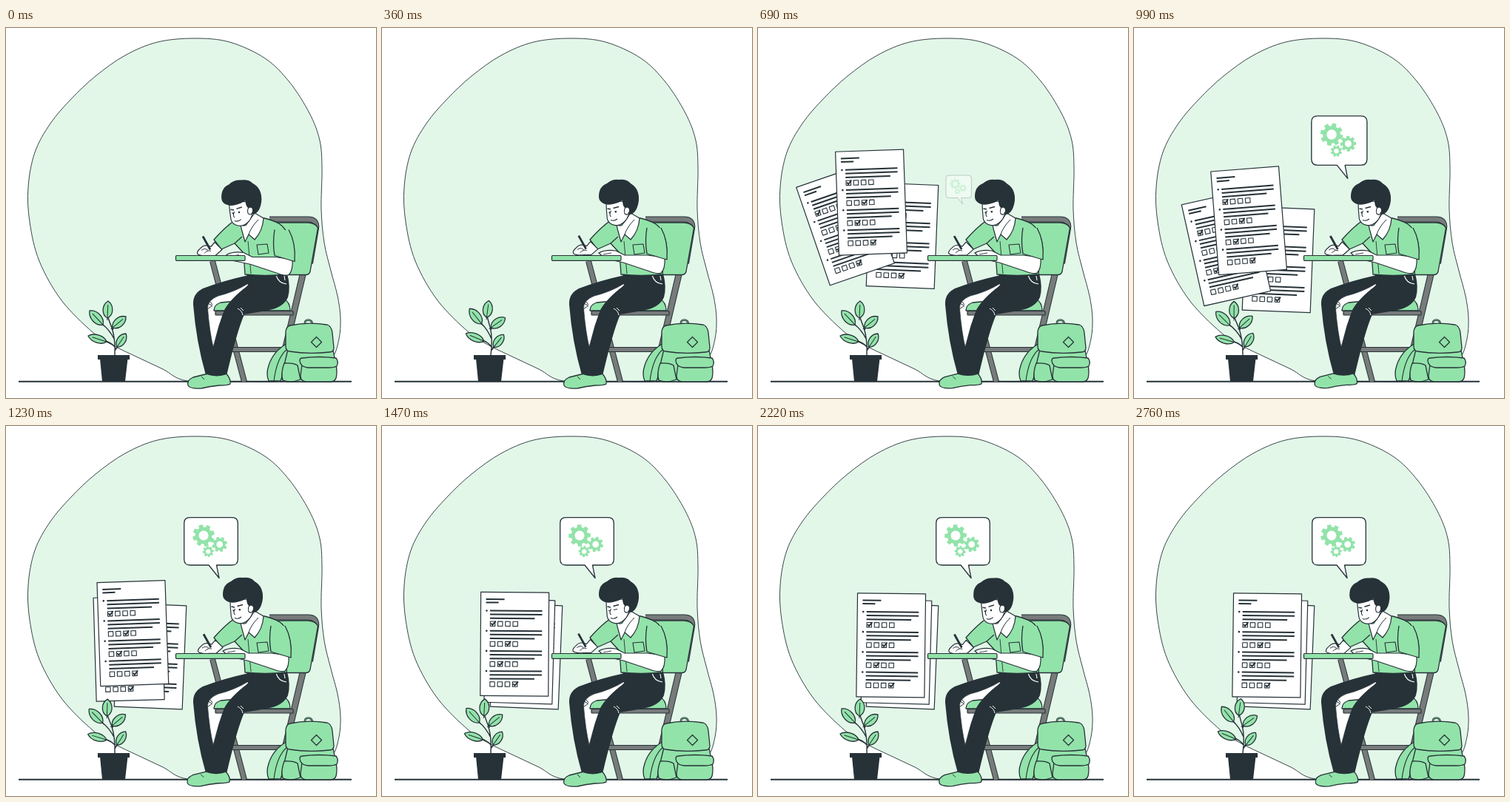
An HTML page with a canvas that plays this animation: 500 by 500 pixels, repeating every 2790 ms.

```html
<!DOCTYPE html>
<html lang="en">
<head>
<meta charset="utf-8">
<title>Student taking an exam</title>
<style>
html, body { margin: 0; width: 100%; height: 100%; overflow: hidden; background: #fff; }
canvas { display: block; width: 500px; height: 500px; }
</style>
</head>
<body>
<canvas id="stage" width="500" height="500"></canvas>
<script>
const ctx = document.getElementById('stage').getContext('2d');
const LOOP = 2790;
const INK = '#263238', GREEN = '#92e3a9', GRAY = '#777b7a', WHITE = '#fff', PALE = '#e3f7e9';

const clamp = v => Math.max(0, Math.min(1, v));
const lerp = (a, b, p) => a + (b - a) * p;
const inOut = p => p < 0.5 ? 4 * p ** 3 : 1 - (2 - 2 * p) ** 3 / 2;

// overshooting cubic-bezier(.36, -.01, .5, 1.38)
function spring(x) {
  const bez = (u, a, b) => 3 * (1 - u) ** 2 * u * a + 3 * (1 - u) * u * u * b + u ** 3;
  let lo = 0, hi = 1;
  for (let i = 0; i < 24; i++) {
    const mid = (lo + hi) / 2;
    if (bez(mid, 0.36, 0.5) < x) lo = mid; else hi = mid;
  }
  return bez(lo, -0.01, 1.38);
}

// smooth interpolation through [time, value] keys
function keyed(t, keys) {
  for (let i = 1; i < keys.length; i++) {
    const [t0, a] = keys[i - 1], [t1, b] = keys[i];
    if (t <= t1) {
      const p = clamp((t - t0) / (t1 - t0));
      return lerp(a, b, p * p * (3 - 2 * p));
    }
  }
  return keys[keys.length - 1][1];
}

function paint(fill, stroke, width = 1.3) {
  if (fill) { ctx.fillStyle = fill; ctx.fill(); }
  if (stroke) { ctx.strokeStyle = stroke; ctx.lineWidth = width; ctx.stroke(); }
}

function shape(d, fill, stroke = INK, width = 1.3) {
  const p = new Path2D(d);
  if (fill) { ctx.fillStyle = fill; ctx.fill(p); }
  if (stroke) { ctx.strokeStyle = stroke; ctx.lineWidth = width; ctx.stroke(p); }
}

const line = (d, width = 1.3, color = INK) => shape(d, null, color, width);

function box(x, y, w, h, r, fill, stroke, width) {
  ctx.beginPath();
  ctx.roundRect(x, y, w, h, r);
  paint(fill, stroke, width);
}

function dot(x, y, r, color = INK) {
  ctx.beginPath();
  ctx.arc(x, y, r, 0, Math.PI * 2);
  paint(color);
}

// closed smooth outline through points
function smooth(pts, fill, stroke, width) {
  const n = pts.length, at = i => pts[(i + n) % n];
  ctx.beginPath();
  ctx.moveTo(...pts[0]);
  for (let i = 0; i < n; i++) {
    const [a, b, c, d] = [at(i - 1), at(i), at(i + 1), at(i + 2)];
    ctx.bezierCurveTo(b[0] + (c[0] - a[0]) / 6, b[1] + (c[1] - a[1]) / 6,
      c[0] - (d[0] - b[0]) / 6, c[1] - (d[1] - b[1]) / 6, c[0], c[1]);
  }
  paint(fill, stroke, width);
}

function placed(x, y, deg, draw) {
  ctx.save();
  ctx.translate(x, y);
  ctx.rotate(deg * Math.PI / 180);
  draw();
  ctx.restore();
}

const turned = (x, y, deg, draw) => placed(x, y, deg, () => { ctx.translate(-x, -y); draw(); });

const BLOB = [[255, 14], [302, 19], [350, 41], [383, 73], [410, 115], [424, 152], [427, 190],
  [426, 245], [430, 290], [439, 328], [448, 362], [452, 392], [450, 420], [441, 446], [418, 467],
  [385, 477], [320, 478], [245, 477], [212, 461], [178, 445], [145, 429], [117, 411], [75, 368],
  [45, 315], [32, 262], [30, 215], [39, 168], [60, 129], [88, 96], [121, 65], [161, 37], [205, 19]];

function backdrop() {
  smooth(BLOB, PALE, INK, 0.9);
  line('M17 477.800H467', 2);
}

function paper() {
  box(-46, -70, 92, 140, 0, WHITE, INK, 1.2);
  ctx.save();
  ctx.translate(-46, -70);
  line('M7 9.5H32M7 14H24', 2);
  [0, 2, 1, 3].forEach((tick, row) => {
    const y = 25 + row * 27.2;
    dot(8, y, 1.3);
    line(`M12.5 ${y}H83M12.5 ${y + 5}H83M12.5 ${y + 10.3}H73`, 2);
    for (let i = 0; i < 4; i++) {
      const x = 13 + i * 10.2;
      box(x, y + 14.5, 6.4, 6.4, 0, WHITE, INK, 1.1);
      if (i === tick) line(`M${x + 1} ${y + 17}l2 2.4 4.4-5.4`, 1.9);
    }
  });
  ctx.restore();
}

function papers(t) {
  const run = (t - 440) / 570;
  if (run <= 0) return;
  const drop = spring(clamp(run));
  const f = clamp((t - 690) / 910), p = inOut(f);
  const lift = Math.sin(Math.PI * f) * (1 - f);
  ctx.save();
  ctx.globalAlpha = clamp(drop * 2);
  ctx.translate(0, -80 * (1 - drop));
  placed(195, 311, 2.3, paper);
  placed(lerp(118, 187, p) - 6 * lift, lerp(297, 305, p) - 5 * lift, lerp(-19, 1.5, p) + 6 * lift, paper);
  placed(lerp(153, 179.7, p) - 3 * lift, lerp(266, 296.4, p) - 21 * lift, lerp(-2, 0.7, p) - 5 * lift, paper);
  ctx.restore();
}

function gear(x, y, r, hole, deg) {
  placed(x, y, deg, () => {
    ctx.beginPath();
    for (let i = 0; i < 8; i++) {
      const a = i * Math.PI / 4;
      [[-0.26, 0.76], [-0.18, 1], [0.18, 1], [0.26, 0.76]].forEach(([da, k]) =>
        ctx.lineTo(Math.cos(a + da) * r * k, Math.sin(a + da) * r * k));
    }
    ctx.closePath();
    ctx.moveTo(hole, 0);
    ctx.arc(0, 0, hole, 0, Math.PI * 2);
    ctx.fillStyle = GREEN;
    ctx.fill('evenodd');
  });
}

function bubble(t) {
  const run = (t - 497) / 520;
  if (run <= 0) return;
  const s = spring(clamp(run)), spin = t * 0.06;
  if (s <= 0) return;
  ctx.save();
  ctx.globalAlpha = clamp(s < 0.6 ? s * 0.8 : 0.48 + (s - 0.6) * 1.3);
  ctx.translate(266, 267);
  ctx.scale(s, s);
  ctx.translate(-266, -267);
  shape('M248.5 123.7H305.5Q313.3 123.7 313.3 131.5V180Q313.3 188 305.5 188H284.5L288 205.5 274 188H248.5Q240.7 188 240.7 180V131.5Q240.7 123.7 248.5 123.7Z', WHITE);
  gear(267, 148, 15, 6.5, spin);
  gear(288.7, 160, 10.4, 4.4, -spin + 12);
  gear(273.2, 169.6, 7.6, 3.2, spin + 8);
  ctx.restore();
}

function leaf(x0, y0, x1, y1, width) {
  const len = Math.hypot(x1 - x0, y1 - y0);
  placed(x0, y0, Math.atan2(y1 - y0, x1 - x0) * 180 / Math.PI, () => {
    shape(`M0 0C${len * 0.2} ${-width} ${len * 0.75} ${-width} ${len} 0C${len * 0.75} ${width} ${len * 0.2} ${width} 0 0Z`, GREEN);
    line(`M-3 0H${len * 0.78}`, 1);
  });
}

function plant(t) {
  const sway = keyed(t, [[0, 0], [360, 5], [690, 0], [990, -2.2], [1470, 0.8], [2220, 0], [2760, 5], [2790, 3]]);
  turned(147, 442, sway, () => {
    line('M147 443Q148 420 143 405Q139 395 137 388M146 420Q140 408 130 400M144 408L147 402M147 431Q142 425 134 423M147 436L151 430', 1.4);
    leaf(137, 392, 138, 369, 8.5);
    leaf(131, 401, 113, 382, 8.5);
    leaf(144, 405, 162, 390, 8);
    leaf(136, 424, 111, 416, 7);
    leaf(150, 431, 162, 413, 7.5);
  });
  box(124, 442, 43, 6, 0, INK);
  shape('M127 447H164.5L161 477.5H130Z', INK, null);
}

function tube(d, width) {
  line(d, width + 2);
  line(d, width, GRAY);
}

function chair() {
  tube('M279 315L322 478', 6);
  tube('M356 258.5H408Q421 258.5 419 271L411 318', 6);
  tube('M403 325L367 478', 7);
  tube('M306 434.5H381', 5);
  shape('M360 263H407Q418 263 421.5 270L411 329Q410 333.5 405 333.5H370Z', GREEN);
}

function seat() {
  box(283, 382.5, 105, 5.5, 1, GRAY, INK, 1.2);
  shape('M281 382Q281 374 290 371L345 366H375Q384 370 384 382Z', GREEN);
}

function bag() {
  shape('M380 426Q361 437 355 456Q351 468 355 477H371L382 446Z', GREEN);
  line('M380 434Q366 445 362 477', 1.1);
  line('M404 401Q403 394.5 409 394.5Q414 395 414 401', 2.6);
  line('M404 401Q403 394.5 409 394.5Q414 395 414 401', 0.8, GREEN);
  shape('M382 430H440Q446 446 446 470Q446 478 438 478H380Q371 478 373 468Z', GREEN);
  shape('M384 402Q408 397 434 401Q440 403 441 412L443 432Q443 438 437 438Q408 441 383 437Q378 436 378 430L378 410Q379 403 384 402Z', GREEN);
  shape('M419.5 417.5L426.5 424.5 419.5 431.5 412.5 424.5Z', GREEN);
  shape('M376 453Q388 452 394 456L398 475Q385 480 374 476Q371 466 376 453Z', GREEN);
  shape('M400 455H446Q448 465 446 473Q444 478 438 478H405Q398 477 398 470Z', GREEN);
  shape('M400 446Q424 443 446 446Q450 451 447 457Q443 459 436 459H408Q398 458 397 450Q397 446 400 446Z', GREEN);
}

function legs(t) {
  const foot = keyed(t, [[0, 0], [360, 0], [990, -1.6], [1470, 0], [2220, -1], [2700, -1.6], [2790, 0]]);
  shape('M328 334Q295 341 266 352Q252 359 253 374Q257 424 270 469H285L291 380 330 350Z', INK, null);
  shape('M328 345Q308 357 287 362Q272 368 272.5 379Q275 410 280 431L288 402 296 380Q305 366 324 351Z', WHITE, INK, 0.6);
  line('M273 372l5 3M272 380l7-5M276 370l3 4', 1);
  seat();
  shape('M325 332H380Q385 350 381 364Q375 378 352 382L322 387Q312 410 298 470L270.5 469Q276 448 281 430Q287 402 295 381Q303 366 328 347Z', INK, null);
  line('M365 334Q368 345 379 346M376 335l1 6', 1.1, WHITE);
  line('M313 379Q319 382 320 388M317 378l4 4', 1, WHITE);
  line('M321 352l6-5', 1, WHITE);
  ctx.save();
  ctx.translate(foot, foot / 3);
  shape('M246 483Q244 476 253 472L271 467.5Q285 472 298 467.5Q304 474 303 481Q300 483 288 483Q276 484 264 487Q249 488 246 483Z', GREEN);
  line('M264 471l4 4', 1);
  ctx.restore();
}

function torso() {
  shape('M309 260Q296 269 281 286L291 299 309 291 321 304 323 333Q350 336 379 333L381 306 385 302Q384 275 370 265Q358 258 343 256Z', GREEN);
  line('M309 291L319 282M376 333L379 309', 1.1);
  shape('M339 293L353 292 355 304 341 306Z', null, INK, 1.1);
  line('M327 288L331 332', 0.9);
  shape('M317 265Q323 270 326 264L336 250 348 257Q347 274 336 286L328 279 323 289 318 271Z', WHITE, INK, 1.2);
  line('M328 279Q331 269 341 259', 1);
}

function writingHand(t) {
  const dx = Math.sin(t / 60), dy = Math.cos(t / 90) * 0.5;
  ctx.save();
  ctx.translate(dx, dy);
  shape('M282 289L277 295Q268 291 263 297Q257 302 259 305Q263 308 273 307H283L292 299Z', WHITE, INK, 1.2);
  line('M266 281L276 299', 2.8);
  line('M264 300Q269 296 273 300M268 304Q272 299 277 301', 1);
  ctx.restore();
}

function restingArm(t) {
  const off = 5 * (1 - inOut(clamp(t / 300)));
  ctx.save();
  ctx.translate(off, off * 0.5);
  shape('M293 304Q302 299 316 301L328 307 358 307 382 310Q383 326 377 331Q372 333 362 329L326 317Q313 314 302 312Z', WHITE, INK, 1.2);
  line('M299 306L310 304', 0.9);
  shape('M358 273Q356 290 358 305L385 313Q387 288 377 270Z', GREEN, null);
  line('M358 270Q355 288 358 305L385 313Q387 288 377 270', 1.3);
  ctx.restore();
}

function head(t) {
  const tilt = keyed(t, [[0, -3], [330, 0], [1600, 0], [2160, -3], [2700, -2.3], [2790, -3]]);
  const blink = t > 1380 && t < 1540;
  turned(329, 264, tilt, () => {
    shape('M303 233Q303 245 304 254Q304 262 310 265Q318 269 325 264Q332 259 334 250L336 235Z', WHITE, INK, 1.2);
    shape('M293 228Q293 214 304 210Q311 204 320 205Q331 204 336 210Q348 217 347 233Q345 249 336 252L330 250 328 243Q325 240 325 233Q319 237 312 238Q304 240 299 237Q293 234 293 228Z', INK, null);
    shape('M328 251Q326 243 331 242Q336 243 334 249Q332 254 328 251Z', WHITE, INK, 1.1);
    line('M304.5 244L309 245M312.5 243.5L320 241.5', 1.5);
    if (blink) {
      line('M306 249.5H309M313 248.5L318 247.5', 1.1);
    } else {
      dot(307.5, 249.3, 1.1);
      dot(315.8, 248.3, 1.3);
    }
    line('M309.5 247Q306.5 253 309.5 255M309 259.5Q314 261.5 318 258', 1.1);
  });
}

function table() {
  box(229.5, 307.5, 93.5, 6.8, 1, GREEN, INK, 1.2);
}

function draw(t) {
  ctx.clearRect(0, 0, 500, 500);
  ctx.lineJoin = 'round';
  backdrop();
  papers(t);
  bubble(t);
  plant(t);
  chair();
  legs(t);
  torso();
  head(t);
  writingHand(t);
  restingArm(t);
  table();
  bag();
}

const start = performance.now();
function tick() {
  const t = (performance.now() - start) % LOOP;
  draw(Math.floor(t / 30) * 30);
  requestAnimationFrame(tick);
}
tick();
</script>
</body>
</html>
```
